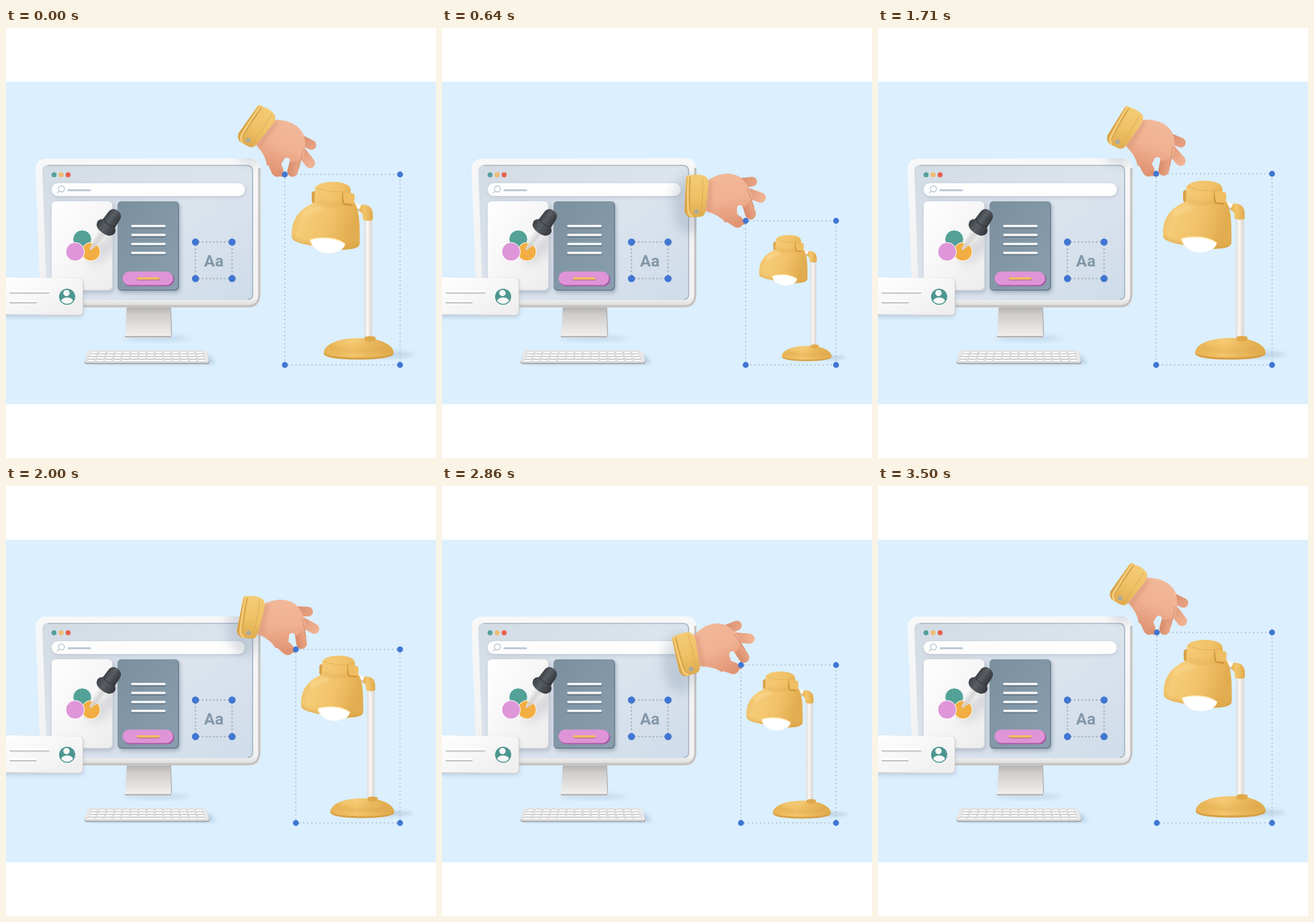
These frames come from a looping animation (640 by 640 pixels, 3.57 s). An HTML page:

```html
<!DOCTYPE html>
<html lang="en">
<head>
<meta charset="utf-8">
<title>Resizing a lamp</title>
<style>
  html, body { margin: 0; width: 100%; height: 100%; overflow: hidden; background: #fff; }
  svg { display: block; width: 100%; height: 100%; }
  .dots { fill: none; stroke: #bac5d2; stroke-width: 2.3; stroke-linecap: round; stroke-dasharray: 0 6; }
  .small { stroke: #a5b4c4; stroke-width: 2.6; stroke-dasharray: 0 5.45; }
  .knob { fill: #4076d2; }
  .bar { fill: none; stroke-linecap: round; }
</style>
</head>
<body>
<svg viewBox="0 0 640 640">
  <defs>
    <linearGradient id="screen" x1="0" y1="0" x2="1" y2="1">
      <stop offset="0" stop-color="#d3dbe4"/><stop offset=".5" stop-color="#dce4ed"/><stop offset="1" stop-color="#cfdcea"/>
    </linearGradient>
    <linearGradient id="bezel" x1="0" y1="0" x2="0" y2="1">
      <stop offset="0" stop-color="#f8f8f8"/><stop offset=".94" stop-color="#f1f1f1"/><stop offset="1" stop-color="#d8d7d6"/>
    </linearGradient>
    <linearGradient id="stand" x1="0" y1="0" x2="0" y2="1">
      <stop offset="0" stop-color="#aaa9a8"/><stop offset=".3" stop-color="#cfcecd"/><stop offset=".85" stop-color="#ebeae9"/><stop offset="1" stop-color="#f6f5f4"/>
    </linearGradient>
    <linearGradient id="paper" x1="0" y1="0" x2="1" y2="1">
      <stop offset="0" stop-color="#fff"/><stop offset="1" stop-color="#ededee"/>
    </linearGradient>
    <linearGradient id="slate" x1="0" y1="0" x2="1" y2="1">
      <stop offset="0" stop-color="#7b909f"/><stop offset="1" stop-color="#8a9eae"/>
    </linearGradient>
    <linearGradient id="rubber" x1="0" y1="0" x2="1" y2="0">
      <stop offset="0" stop-color="#3a3f44"/><stop offset=".4" stop-color="#595e64"/><stop offset="1" stop-color="#33373c"/>
    </linearGradient>
    <linearGradient id="glass" x1="0" y1="0" x2="1" y2="0">
      <stop offset="0" stop-color="#fff" stop-opacity=".85"/><stop offset=".55" stop-color="#d2d2d3" stop-opacity=".85"/><stop offset="1" stop-color="#f0f0f0" stop-opacity=".9"/>
    </linearGradient>
    <linearGradient id="shade" x1="0" y1="0" x2="1" y2=".3">
      <stop offset="0" stop-color="#e9b659"/><stop offset=".3" stop-color="#f5cb77"/><stop offset=".65" stop-color="#f2c269"/><stop offset="1" stop-color="#e2ad50"/>
    </linearGradient>
    <linearGradient id="gold" x1="0" y1="0" x2="1" y2="0">
      <stop offset="0" stop-color="#e7b253"/><stop offset=".4" stop-color="#f3c56b"/><stop offset="1" stop-color="#dfa94b"/>
    </linearGradient>
    <linearGradient id="pole" x1="0" y1="0" x2="1" y2="0">
      <stop offset="0" stop-color="#dddbda"/><stop offset=".4" stop-color="#faf7f5"/><stop offset="1" stop-color="#d6d2cf"/>
    </linearGradient>
    <linearGradient id="cuff" gradientUnits="userSpaceOnUse" x1="388" y1="118" x2="358" y2="174">
      <stop offset="0" stop-color="#f4cb76"/><stop offset=".55" stop-color="#efc165"/><stop offset="1" stop-color="#dfac50"/>
    </linearGradient>
    <linearGradient id="skin" gradientUnits="userSpaceOnUse" x1="425" y1="140" x2="395" y2="215">
      <stop offset="0" stop-color="#f2b899"/><stop offset=".5" stop-color="#efb191"/><stop offset="1" stop-color="#e09373"/>
    </linearGradient>
    <linearGradient id="finger" gradientUnits="userSpaceOnUse" x1="432" y1="165" x2="460" y2="200">
      <stop offset="0" stop-color="#d98c6c"/><stop offset="1" stop-color="#f0b292"/>
    </linearGradient>
    <linearGradient id="index" gradientUnits="userSpaceOnUse" x1="422" y1="200" x2="442" y2="204">
      <stop offset="0" stop-color="#d98c6c"/><stop offset="1" stop-color="#eeae8e"/>
    </linearGradient>
    <filter id="soft" x="-50%" y="-50%" width="200%" height="200%"><feGaussianBlur stdDeviation="3"/></filter>
    <filter id="haze" x="-50%" y="-80%" width="200%" height="260%"><feGaussianBlur stdDeviation="8"/></filter>
    <clipPath id="desk"><rect x="44" y="194" width="335" height="222" rx="16"/></clipPath>
    <clipPath id="card"><rect x="68" y="258" width="90" height="131.500" rx="6"/></clipPath>
    <clipPath id="face"><circle cx="91" cy="400" r="10.600"/></clipPath>
    <path id="bell" d="M460 239C462 226 513 225 513 241L514 254C526 264 527 288 526.500 321C526 331 499 332 474 327C448 323 428 320 425.500 312C424 290 432 271 459 260Z"/>
    <clipPath id="inBell"><use href="#bell"/></clipPath>
  </defs>

  <rect y="80" width="640" height="480" fill="#dbeffe"/>

  <!-- monitor -->
  <ellipse cx="225" cy="462" rx="50" ry="4" fill="#8da8c2" opacity=".3" filter="url(#soft)"/>
  <path d="M180 412H245L247 456Q247 461 242 461H180Q176 461 177 456Z" fill="url(#stand)"/>
  <path d="M177 459.500H246" stroke="#a9a8a8" stroke-width="2.200"/>
  <path d="M245 414L246.500 458" stroke="#b5b4b3" stroke-width="1.500"/>
  <path d="M60 194.500L363 194Q378 194 378.500 210V400Q378 416 362 416H68Q52 416 51 400L44 211Q44 195 60 194.500Z" fill="url(#bezel)"/>
  <path d="M377 208V398Q376 413.500 361 414H66Q56 412 53 404" fill="none" stroke="#c3c1c0" stroke-width="3.200"/>
  <path d="M62 204H359Q368 204 368 213V397Q368 405 360 405H69Q61 405 60.500 397L54 213Q54 204 62 204Z" fill="url(#screen)"/>
  <path d="M62 204.500H359Q367 205 367 213V397Q367 403 360 404" fill="none" stroke="#a9b6c4" stroke-width="1.600"/>

  <circle cx="71.500" cy="218.500" r="3.700" fill="#55a09c"/>
  <circle cx="82" cy="218.500" r="3.700" fill="#f0bd70"/>
  <circle cx="92.500" cy="218.500" r="3.700" fill="#e8604e"/>
  <rect x="69" y="233" width="287" height="19" rx="9.500" fill="#8d9bab" opacity=".35" filter="url(#soft)"/>
  <rect x="68" y="231" width="287.500" height="19" rx="9.500" fill="#fdfdfd"/>
  <g fill="none" stroke="#c3ccd4" stroke-width="1.600" stroke-linecap="round">
    <circle cx="82.500" cy="239.500" r="4.400"/><path d="M79 243L76.500 245.500"/>
  </g>
  <path class="bar" d="M93 241.500H125" stroke="#bccbd9" stroke-width="3.200"/>

  <!-- cards -->
  <rect x="70" y="261" width="91" height="133" rx="6" fill="#6f7f90" opacity=".4" filter="url(#soft)"/>
  <rect x="68" y="258" width="91" height="133" rx="6" fill="#d6d8db"/>
  <rect x="68" y="258" width="90" height="131.500" rx="6" fill="url(#paper)"/>
  <g clip-path="url(#card)">
    <path d="M132 340L166 312" stroke="#8c9199" stroke-width="22" stroke-linecap="round" opacity=".28" filter="url(#haze)"/>
  </g>
  <g stroke="#fff" stroke-width="1">
    <circle cx="113.500" cy="314.500" r="13.800" fill="#53a197"/>
    <circle cx="126.500" cy="333" r="13.800" fill="#f2ae43"/>
    <circle cx="102.800" cy="333" r="13.800" fill="#de96d8"/>
  </g>
  <rect x="168" y="261" width="91" height="133" rx="6" fill="#5b6c7d" opacity=".45" filter="url(#soft)"/>
  <rect x="166" y="258" width="91.500" height="133" rx="6" fill="#677c8c"/>
  <rect x="166" y="258" width="90" height="131.500" rx="6" fill="url(#slate)"/>
  <g transform="translate(160 281) rotate(35)">
    <path d="M-9 20H9V36Q7 46 3 53L1 60H-2L-3 53Q-8 45 -9 36Z" fill="url(#glass)"/>
    <path d="M-10.500 -1Q-10 -11 0 -11Q10 -11 10.500 -1L11 14H-11Z" fill="url(#rubber)"/>
    <path d="M-9 11H9Q16 14 15.500 20Q14 29 0 29Q-14 29 -15.500 20Q-16 14 -9 11Z" fill="url(#rubber)"/>
    <path d="M-11 11Q0 17 11 11" fill="none" stroke="#2b2f33" stroke-width="1.500" opacity=".6"/>
  </g>
  <path class="bar" d="M188 296.500H236M188 309.800H236M188 323H236M188 336.300H236" stroke="#617687" stroke-width="3.800"/>
  <path class="bar" d="M188 294.800H236M188 308H236M188 321.500H236M188 334.800H236" stroke="#f5f6f7" stroke-width="3.600"/>
  <rect x="174.500" y="364" width="76" height="20.500" rx="10" fill="#a65ea5"/>
  <rect x="173.500" y="362.500" width="75" height="20" rx="10" fill="#df94d8"/>
  <path class="bar" d="M196.500 374H227" stroke="#b56fa6" stroke-width="3.600"/>
  <path class="bar" d="M196.500 372.700H227" stroke="#f4bd60" stroke-width="3.400"/>
  <rect class="dots small" x="282" y="318.500" width="54.500" height="54.500"/>
  <g class="knob">
    <circle cx="282" cy="318.500" r="5.300"/><circle cx="336.500" cy="318.500" r="5.300"/>
    <circle cx="282" cy="373" r="5.300"/><circle cx="336.500" cy="373" r="5.300"/>
  </g>
  <text x="309.300" y="355" text-anchor="middle" font-family="Roboto, Inter, sans-serif" font-weight="700" font-size="24" fill="#8398a8">Aa</text>

  <rect x="-8" y="376" width="123" height="54" rx="5" fill="#728aa2" opacity=".35" filter="url(#soft)"/>
  <path d="M-8 371L110 372.500Q115 373 115 378V423Q115 428 110 428.500L-8 427.500Z" fill="#d0d1d3"/>
  <path d="M-8 371L109 372.500Q114 373 114 378V421.500Q114 426.500 109 427L-8 426Z" fill="url(#paper)"/>
  <path class="bar" d="M7 393.800H63M7 408.300H44" stroke="#bfc2c6" stroke-width="3.400"/>
  <path class="bar" d="M7 392H63M7 406.500H44" stroke="#fff" stroke-width="3"/>
  <circle cx="91" cy="400" r="12" fill="#4d9790"/>
  <g clip-path="url(#face)" fill="#f7f7f7">
    <circle cx="90" cy="394.500" r="4.700"/><ellipse cx="91" cy="408" rx="9.500" ry="7"/>
  </g>

  <!-- keyboard -->
  <path d="M125 488H302L312 499H130Z" fill="#7891ab" opacity=".4" filter="url(#soft)"/>
  <path d="M125 480H294Q298 480 299 483L303 497Q303 500.500 299 500.500H120Q116 500 117 497L121 483Q122 480 125 480Z" fill="#aeb0b4"/>
  <path d="M125 479.500H294Q298 479.500 299 482L302 495Q302 498 298 498H121Q117 498 118 495L121 482Q122 479.500 125 479.500Z" fill="#e9e9ea"/>
  <g id="keys" fill="#fff" stroke="#c0c1c4" stroke-width=".8"></g>

  <!-- hand shadow on the monitor -->
  <g clip-path="url(#desk)">
    <ellipse id="cast" rx="26" ry="44" fill="#62768c" opacity=".22" filter="url(#haze)"/>
  </g>

  <g id="lamp">
    <ellipse cx="565" cy="486" rx="42" ry="4.500" fill="#7996b3" opacity=".3" filter="url(#soft)"/>
    <path d="M473 484C475 473 487 468 500 465C515 461 537 461 550 464.500C564 468 575 474 577 484C577 491 552 493.500 525 493.500C496 493.500 473 491 473 484Z" fill="#d79f44"/>
    <path d="M473 482C475 472 487 467 500 464C515 461 537 461 550 463.500C564 467 575 473 577 482C576 488 552 490.500 525 490.500C496 490.500 474 488 473 482Z" fill="url(#gold)"/>
    <path d="M484 474Q490 480 525 481Q560 480 567 474" fill="none" stroke="#d39b40" stroke-width="3" opacity=".55" filter="url(#soft)"/>
    <path d="M490 471C500 466 515 465 530 465" fill="none" stroke="#fbdc97" stroke-width="3" opacity=".6" filter="url(#soft)"/>
    <rect x="533" y="284" width="12" height="178" fill="url(#pole)"/>
    <path d="M534 460Q541 457 550 460V465Q541 469 534 465Z" fill="#dfa94a"/>
    <path d="M514 262L534 271" stroke="#c9c5c1" stroke-width="10"/>
    <path d="M514 260.500L534 269.500" stroke="#faf7f4" stroke-width="7"/>
    <path d="M529 263Q545 262 546 277V285Q540 289 531 285V278Q529 274 525 272Z" fill="url(#gold)"/>
    <rect x="455" y="243" width="10" height="18" rx="4" fill="#d9a148"/>
    <use href="#bell" fill="url(#shade)"/>
    <g clip-path="url(#inBell)">
      <path d="M424 312C430 323 470 328 500 331Q520 332 528 324" fill="none" stroke="#cf9439" stroke-width="5" opacity=".6" filter="url(#soft)"/>
      <path d="M461 258Q486 269 514 256" fill="none" stroke="#cd9640" stroke-width="3" opacity=".5" filter="url(#soft)"/>
      <path d="M441 280Q450 270 470 268" fill="none" stroke="#ffe2a2" stroke-width="6" opacity=".55" filter="url(#soft)"/>
    </g>
    <path d="M462 238Q487 248 513 241" fill="none" stroke="#dba850" stroke-width="1.200" opacity=".6"/>
    <path d="M452 315C468 309 494 311 505 321C503 331 490 335.500 478 335C464 334 454 326 452 315Z" fill="#ffeec4"/>
    <path d="M454 316C470 311 494 314 504.500 322C502 331 490 335.500 478 335C464 334 456 327 454 316Z" fill="#fff"/>
    <path d="M501 244L517 247Q519 256 515 265L502 263Q499 254 501 244Z" fill="#cf9639"/>
    <path d="M502 244L518 246.500Q520 254 517 262L504 261Q501 253 502 244Z" fill="#efbd62"/>
  </g>

  <path id="frame" class="dots"/>
  <g id="hand" stroke-linecap="round" stroke-linejoin="round">
    <path d="M436 165L454.500 174" stroke="url(#finger)" stroke-width="14.500"/>
    <path d="M438 182L452.500 201" stroke="url(#finger)" stroke-width="15"/>
    <path d="M434 186L426.500 213.500" stroke="url(#index)" stroke-width="16"/>
    <path d="M393 188L404 212.500" stroke="url(#skin)" stroke-width="18"/>
    <path d="M396 137C420 135 436 145 442 157C447 168 446 184 441 195L424 200C422 191 415 191 412 199L406 208L388 204C387 194 383 186 371 172Z" fill="url(#skin)"/>
    <path d="M406 215Q411 219 414 218" fill="none" stroke="#e09373" stroke-width="7"/>
    <path d="M442 180Q440 194 436 207" fill="none" stroke="#c97a5c" stroke-width="1.300" opacity=".55"/>
    <path d="M401 141Q388 158 377 175" fill="none" stroke="#b87354" stroke-width="5" opacity=".4" filter="url(#soft)"/>
    <path d="M375 115Q390 117 400 129Q402 135 398 142L372 174Q367 180 360 176L348 169Q344 165 346 157Z" fill="url(#cuff)"/>
    <path d="M377 115Q364 131 346 157Q344 163 348 168L354 160Q369 136 381 119Z" fill="#d8a347"/>
    <path d="M379 116Q366 133 351 159Q348 164 351 169" fill="none" stroke="#f4cd7a" stroke-width="3"/>
    <path d="M395 130Q382 152 365 173" fill="none" stroke="#dcaa52" stroke-width="1"/>
    <circle cx="360.500" cy="167" r="3.300" fill="#a7a99f"/>
  </g>
  <g id="corners" class="knob"></g>
</svg>

<script>
const $ = id => document.getElementById(id);
const LOOP = 3570, FRAMES = 50, PERIOD = 24.5;
const RIGHT = 586.5, BOTTOM = 501.5;

// step, handle x, handle y, lamp scale, hand tilt
const POSES = [
  [0, 415, 218, 1, 59.5],
  [1, 417, 224, .985, 60],
  [4, 434, 247, .9, 31],
  [7.5, 448.5, 272, .81, 4.2],
  [9, 452, 287, .71, 27],
  [11, 455, 293, .705, 29],
  [14, 451, 281, .76, 8],
  [15.5, 445, 266.5, .828, 11.7],
  [17, 423, 235, .943, 48.4],
  [18.5, 416, 221, .995, 46],
  [21, 413, 215, 1.012, 19],
  [23.5, 413.5, 216, 1.01, 45],
  [24, 414, 217, 1.007, 56]
];

const poseAt = i => {
  const n = POSES.length, turn = Math.floor(i / n);
  const p = POSES[i - turn * n];
  return [p[0] + turn * PERIOD, ...p.slice(1)];
};

// Smooth cubic through the poses, wrapping around the cycle.
function pose(step) {
  let i = POSES.length - 1;
  while (POSES[i][0] > step) i--;
  const [a, b, c, d] = [-1, 0, 1, 2].map(k => poseAt(i + k));
  const h = c[0] - b[0], u = (step - b[0]) / h;
  return [1, 2, 3, 4].map(k => {
    const m = (c[k] - a[k]) / (c[0] - a[0]) * h;
    const n = (d[k] - b[k]) / (d[0] - b[0]) * h;
    const e = c[k] - b[k];
    return b[k] + u * (m + u * (3 * e - 2 * m - n + u * (m + n - 2 * e)));
  });
}

function add(parent, tag, attrs) {
  const el = document.createElementNS("http://www.w3.org/2000/svg", tag);
  for (const k in attrs) el.setAttribute(k, attrs[k]);
  return parent.appendChild(el);
}

for (let row = 0; row < 4; row++) {
  const left = 126 - row * 1.6, w = (168 + row * 3) / 14;
  for (let col = 0; col < 14; col++) {
    if (row === 3 && col > 4 && col < 9) continue;
    const wide = row === 3 && col === 4 ? 5 : 1;
    add($("keys"), "rect", { x: left + col * w, y: 481 + row * 4.1, width: w * wide - 1.2, height: 3.3, rx: 1 });
  }
}

const knobs = [0, 1, 2, 3].map(() => add($("corners"), "circle", { r: 4.4 }));

function draw(t) {
  const frame = Math.floor((t % LOOP + 5) / (LOOP / FRAMES)) % FRAMES;
  const [x, y, scale, tilt] = pose(frame % PERIOD);
  $("lamp").setAttribute("transform", `translate(${RIGHT} ${BOTTOM}) scale(${scale}) translate(${-RIGHT} ${-BOTTOM})`);
  $("hand").setAttribute("transform", `translate(${x} ${y}) rotate(${tilt - 59.5}) translate(-415 -218)`);
  $("frame").setAttribute("d", `M${x} ${y}H${RIGHT}V${BOTTOM}M${x} ${y}V${BOTTOM}H${RIGHT}`);
  knobs.forEach((k, i) => {
    k.setAttribute("cx", i % 2 ? RIGHT : x);
    k.setAttribute("cy", i < 2 ? y : BOTTOM);
  });
  const rad = tilt * Math.PI / 180;
  $("cast").setAttribute("cx", x - 84 * Math.cos(rad) - 8);
  $("cast").setAttribute("cy", y - 84 * Math.sin(rad) + 14);
}

let start;
function tick(now) {
  start ??= now;
  draw(now - start);
  requestAnimationFrame(tick);
}
draw(0);
requestAnimationFrame(tick);
</script>
</body>
</html>
```
